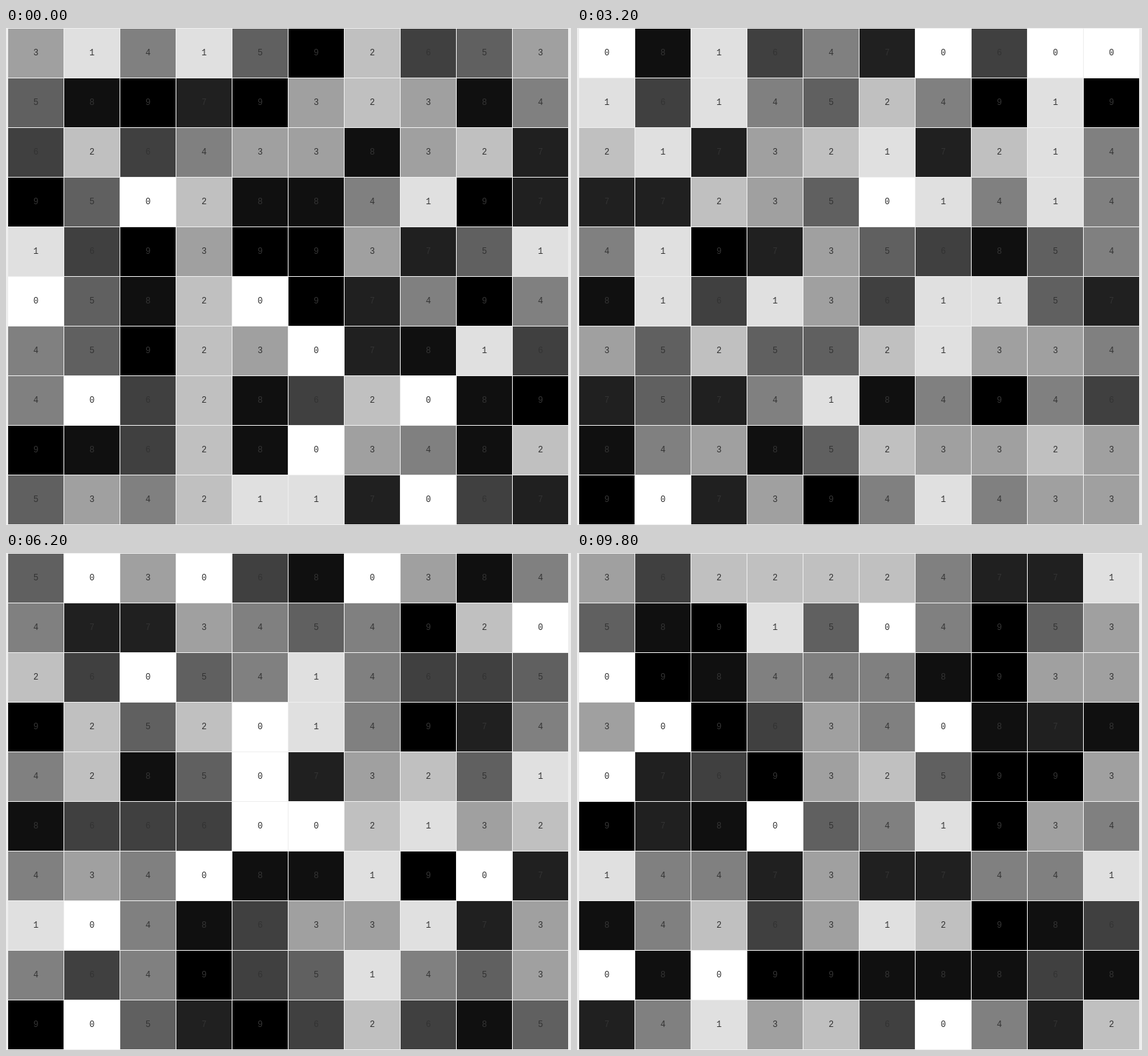
Write an HTML page with a canvas that moves like this. It is 786 px wide and 691 px high and loops after 10000 ms.

```html
<!DOCTYPE html>
<html lang="en">
<head>
<meta charset="utf-8">
<title>Digits of pi</title>
<style>
  html, body { margin: 0; width: 100%; height: 100%; overflow: hidden; background: #eee; }
  canvas { display: block; }
</style>
</head>
<body>
<canvas id="stage" width="786" height="691"></canvas>
<script>
const COLUMNS = 10, ROWS = 10, PAGES = 50, PAGE_MS = 200;
const CELL_W = 78, CELL_H = 69, LEFT = 3, TOP = 1;
const SHADES = ['#fff', '#e0e0e0', '#c0c0c0', '#a0a0a0', '#808080',
                '#606060', '#404040', '#202020', '#101010', '#000'];
const ctx = document.getElementById('stage').getContext('2d');

// Machin's formula: pi = 16 arctan(1/5) - 4 arctan(1/239)
function piDigits(count) {
  const guard = 20;
  const unit = 10n ** BigInt(count + guard);
  const arctanInverse = x => {
    const square = x * x;
    let power = unit / x, sum = power, sign = -1n;
    for (let n = 3n; power > 0n; n += 2n, sign = -sign) {
      power /= square;
      sum += sign * (power / n);
    }
    return sum;
  };
  return (16n * arctanInverse(5n) - 4n * arctanInverse(239n)).toString().slice(0, count);
}

const pageSize = COLUMNS * ROWS;
const digits = piDigits(pageSize * PAGES);

function drawPage(page) {
  ctx.fillStyle = '#eee';
  ctx.fillRect(0, 0, 786, 691);
  ctx.font = '12px "Liberation Mono", "Courier New", monospace';
  ctx.textAlign = 'center';
  for (let i = 0; i < pageSize; i++) {
    const digit = digits[page * pageSize + i];
    const x = LEFT + (i % COLUMNS) * CELL_W;
    const y = TOP + Math.floor(i / COLUMNS) * CELL_H;
    ctx.fillStyle = SHADES[digit];
    ctx.fillRect(x, y, CELL_W - 1, CELL_H - 1);
    ctx.fillStyle = '#333';
    ctx.fillText(digit, x + 38.5, y + 37);
  }
}

let shown = -1;
const start = performance.now();
function tick() {
  const elapsed = performance.now() - start;
  const page = Math.floor(elapsed / PAGE_MS) % PAGES;
  if (page !== shown) drawPage(shown = page);
  requestAnimationFrame(tick);
}
tick();
</script>
</body>
</html>
```
